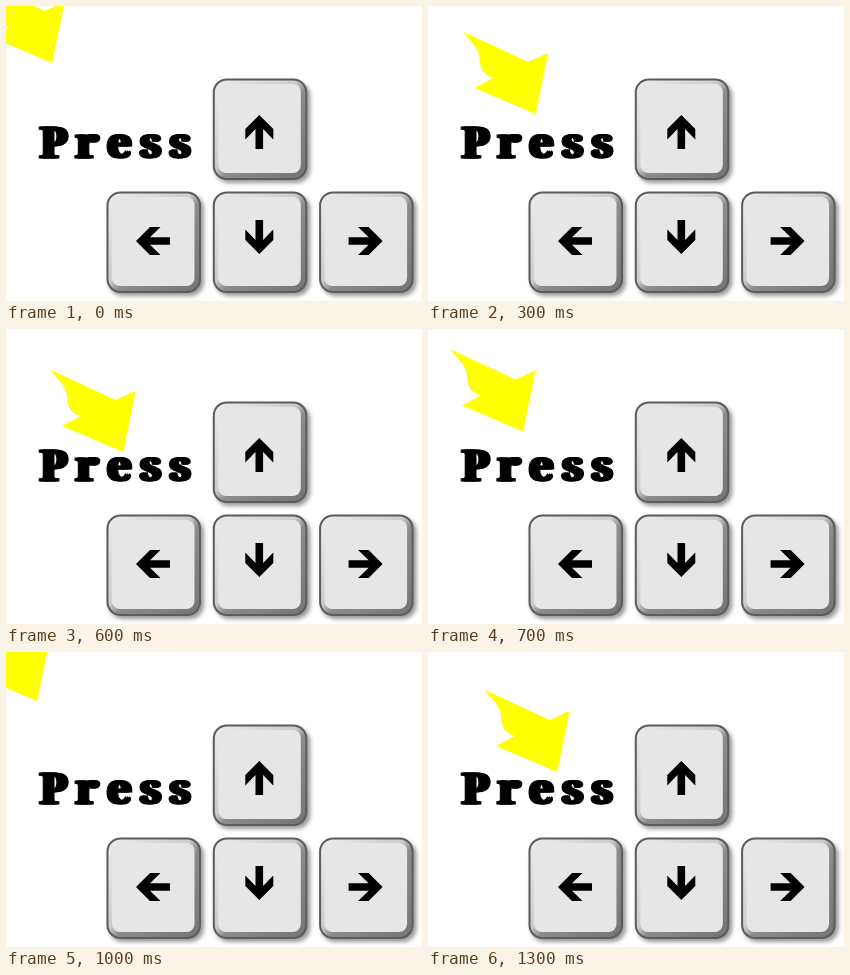
Recreate the animation shown at these times as an HTML page. Size 416x295 px, loop 1.4 s.

```html
<!DOCTYPE html>
<html lang="en">
<head>
<meta charset="utf-8">
<title>Press the arrow keys</title>
<style>
  html, body { margin: 0; width: 100%; height: 100%; overflow: hidden; background: #fff; }
  svg { display: block; width: 100%; height: 100%; }
  text {
    font: 900 43px "Noto Serif", serif;
    letter-spacing: 8.6px;
    stroke: #000;
    stroke-width: 1px;
  }
</style>
</head>
<body>
<svg viewBox="0 0 416 295">
  <defs>
    <filter id="blur" x="-20%" y="-20%" width="140%" height="140%">
      <feGaussianBlur stdDeviation="2"/>
    </filter>
    <linearGradient id="bevel" x1="0" y1="0" x2="1" y2="1">
      <stop offset="0" stop-color="#ededed"/>
      <stop offset=".46" stop-color="#cccccc"/>
      <stop offset=".54" stop-color="#8c8c8c"/>
      <stop offset="1" stop-color="#747474"/>
    </linearGradient>
    <g id="key">
      <rect x="3" y="4" width="95" height="101" rx="14" opacity=".4" filter="url(#blur)"/>
      <rect x="1.5" y="1.5" width="92.5" height="99.5" rx="13" fill="url(#bevel)" stroke="#5c5c5c" stroke-width="2"/>
      <rect x="6" y="6" width="82.5" height="89" rx="8" fill="#e6e6e6"/>
    </g>
    <path id="sign" d="M0-17 14-3V7.5L3.8-3V17H-3.8V-3L-14 7.5V-3Z"/>
  </defs>
  <g id="keys"></g>
  <!-- shifted copies widen the strokes -->
  <text id="word" x="34" y="152">Press</text>
  <use href="#word" x="-2"/>
  <use href="#word" x="2"/>
  <!-- the tip of the pointer is its origin -->
  <path id="pointer" fill="#ff0"
    d="M0 0 12.5-61-7.5-52-73-82.5C-64-71-56-65-56-55C-55-44-52-39-42.5-36L-61-26Z"/>
</svg>
<script>
  const STEP = 100, STEPS = 14;

  function key(col, row, turn) {
    const x = 100 + 106.3 * col, y = 72 + 113 * row;
    const lift = 4 * Math.cos(turn * Math.PI / 180);
    return `<use href="#key" x="${x}" y="${y}"/>
      <use href="#sign" transform="translate(${x + 47} ${y + 50 + lift}) rotate(${turn})"/>`;
  }
  document.getElementById("keys").innerHTML =
    key(1, 0, 0) + [-90, 180, 90].map((turn, col) => key(col, 1, turn)).join("");

  // turning points of the tip: step, x, y; even hops in between
  const path = [
    [0, 46, 57], [2, 87, 94], [4, 128, 122], [5, 142, 135], [6, 117, 123],
    [8, 73, 82], [10, 31, 49], [12, 93, 101], [13, 129, 120], [STEPS, 129, 120]
  ];
  const frames = path.map(([step, x, y], i) => ({
    offset: step / STEPS,
    transform: `translate(${x}px, ${y}px)`,
    easing: i + 1 < path.length ? `steps(${path[i + 1][0] - step}, end)` : "linear"
  }));
  document.getElementById("pointer").animate(frames, {
    duration: STEP * STEPS,
    iterations: Infinity
  });
</script>
</body>
</html>
```
